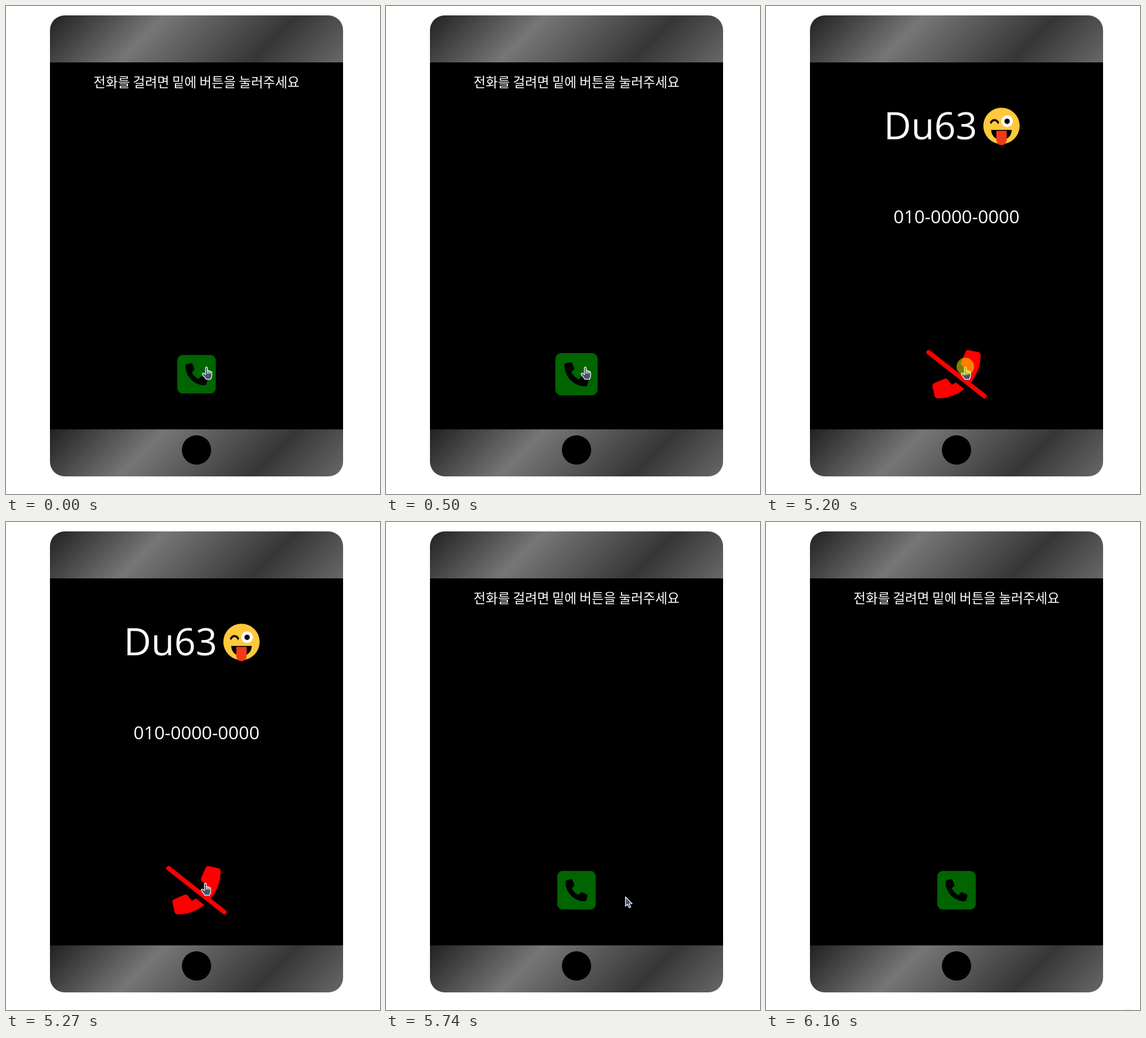
An HTML page with a canvas that plays this animation: 638 by 831 pixels, repeating every 6.23 s.

```html
<!DOCTYPE html>
<html lang="ko">
<head>
<meta charset="utf-8">
<title>Phone call</title>
<style>
  html, body { margin: 0; width: 100%; height: 100%; overflow: hidden; background: #fff; }
  canvas { display: block; }
</style>
</head>
<body>
<canvas id="stage" width="638" height="831"></canvas>
<script>
const ctx = document.getElementById('stage').getContext('2d');
const LOOP = 6230, STEP = 70;
const ANSWER = 2480, HANG_UP = 5410, LEAVE = 5670, LAST_CLICK = 6160;
const KOREAN = '"Noto Sans CJK KR", "Noto Sans CJK JP", "Noto Sans CJK", sans-serif';
const LATIN = '"Open Sans", "Noto Sans", sans-serif';

const callIcon = new Path2D('M64 32C28.7 32 0 60.7 0 96V416c0 35.3 28.7 64 64 64H384c35.3 0 64-28.7 64-64V96c0-35.3-28.7-64-64-64z');
const handset = new Path2D('M154.7 128.7c9.7-2.6 19.9 2.3 23.7 11.6l20 48c3.4 8.2 1 17.6-5.8 23.2L168 231.7c16.6 35.2 45.1 63.7 80.3 80.3l20.2-24.7c5.6-6.8 15-9.2 23.2-5.8l48 20c9.3 3.9 14.2 14 11.6 23.7l-12 44C336.9 378 329 384 320 384C196.3 384 96 283.7 96 160c0-9 6-16.9 14.7-19.3z');
const lowerPiece = new Path2D('M271 367.5L228 313.7c-8.7-10.8-23.7-14.5-36.5-9l-108.5 46.5c-14 6-21.5 21.2-18 35.8l23 100.8C91.3 502 103.8 512 118.5 512c107.4 0 206-37.5 284.2-99.7L314 342.8C300.6 352 286.6 360.3 271 367.5z');
const upperPiece = new Path2D('M471 344c65-79 105-179.5 105-289.5c0-14.7-10-27.2-24.3-30.5L451 .8c-14.7-3.4-29.7 4.2-35.8 18.1l-46.5 108.5c-5.4 12.8-1.8 27.7 9 36.5l53.8 44C419.2 232 404 256.2 386 277.4z');
const slash = new Path2D('M24 24L616 488');
const hand = new Path2D('M-1.6 1.5Q0-.6 1.6 1.5V6.6Q3 5.2 4.2 7.2Q5.8 6 6.8 8.2Q8.8 7.4 9.1 10V15Q9 18 6.8 21.2H-.6L-6.2 13.8Q-8 11-5.6 10.6Q-3.8 10.6-1.6 13Z');
const knuckles = new Path2D('M1.6 6V11M4.2 7V11M6.8 8V11');
const arrow = new Path2D('M.5 .5V16.4L4.2 13L6.7 18.8L9.4 17.6L7 12H12Z');

function disc(x, y, r, color) {
  ctx.fillStyle = color;
  ctx.beginPath();
  ctx.arc(x, y, r, 0, Math.PI * 2);
  ctx.fill();
}

function label(text, x, y, font, align) {
  ctx.font = font;
  ctx.textAlign = align;
  ctx.fillStyle = '#fff';
  ctx.fillText(text, x, y);
}

function metalBar(y, radii) {
  const cy = y + 40, metal = ctx.createLinearGradient(180, cy - 145, 470, cy + 145);
  metal.addColorStop(0, '#222020');
  metal.addColorStop(0.34, '#767676');
  metal.addColorStop(0.73, '#363636');
  metal.addColorStop(1, '#686868');
  ctx.fillStyle = metal;
  ctx.beginPath();
  ctx.roundRect(75, y, 500, 80, radii);
  ctx.fill();
}

// Icons share a 512 unit em and are centred on the button spot.
function icon(width, scale, paint) {
  const s = 75 / 512 * scale;
  ctx.save();
  ctx.translate(325, 627);
  ctx.scale(s, s);
  ctx.translate(-width / 2, -256);
  paint();
  ctx.restore();
}

function callButton(scale) {
  icon(448, scale, () => {
    ctx.fillStyle = '#006400';
    ctx.fill(callIcon);
    ctx.fillStyle = '#000';
    ctx.fill(handset);
  });
}

function hangUpButton() {
  icon(640, 1.1, () => {
    ctx.fillStyle = ctx.strokeStyle = '#f00';
    ctx.fill(lowerPiece);
    ctx.fill(upperPiece);
    ctx.lineWidth = 48;
    ctx.lineCap = 'round';
    ctx.stroke(slash);
  });
}

function emoji() {
  disc(401.7, 204.2, 31, '#ffc83d');
  ctx.strokeStyle = '#000';
  ctx.lineWidth = 3.4;
  ctx.lineCap = 'round';
  ctx.beginPath();
  ctx.arc(389.8, 200.5, 6.3, Math.PI * 1.1, Math.PI * 1.9);
  ctx.stroke();
  disc(411.3, 196.3, 10, '#fff');
  disc(411.3, 196.3, 4.6, '#000');
  ctx.beginPath();
  ctx.ellipse(401.7, 211, 17.5, 17.5, 0, 0, Math.PI);
  ctx.fill();
  ctx.fillStyle = '#f03a17';
  ctx.beginPath();
  ctx.roundRect(392.8, 212.5, 17.8, 24.5, [0, 0, 8.9, 8.9]);
  ctx.fill();
}

function cursor(x, y, shape, details) {
  ctx.save();
  ctx.translate(x, y);
  ctx.lineCap = ctx.lineJoin = 'round';
  ctx.fillStyle = '#46566f';
  ctx.strokeStyle = '#fff';
  ctx.lineWidth = 1.2;
  ctx.fill(shape);
  ctx.stroke(shape);
  if (details) ctx.stroke(details);
  ctx.restore();
}

// The pointer is sampled every 70 ms as it leaves the phone.
function leavingPointer(t) {
  const n = Math.floor((t - LEAVE) / STEP);
  if (n === 0) return [364, 620];
  const p = 1 - Math.pow(1 - Math.min((n - 1) / 6, 1), 1.4);
  return [408 + 209.5 * p, 638 + 206 * p];
}

function pointer(t) {
  if (t >= LEAVE) {
    const [x, y] = leavingPointer(t);
    cursor(x, y, arrow);
    if (t >= LAST_CLICK) click(x, y);
    return;
  }
  cursor(t < STEP ? 342 : 340, 614.5, hand, knuckles);
  if ([430, 5200].some(at => t >= at && t < at + STEP)) click(340, 614);
}

function click(x, y) {
  disc(x, y, 15, 'rgba(255, 255, 0, 0.5)');
}

function draw(t) {
  const calling = t >= ANSWER && t < HANG_UP;
  const blank = t >= HANG_UP && t < LEAVE;
  ctx.fillStyle = '#fff';
  ctx.fillRect(0, 0, 638, 831);
  metalBar(16, [25, 25, 0, 0]);
  metalBar(721, [0, 0, 25, 25]);
  ctx.fillStyle = '#000';
  ctx.fillRect(75, 96, 500, 625);
  if (!blank) disc(325, 756, 25, '#000');

  if (calling) {
    label('Du63', 201, 227, '64px ' + LATIN, 'left');
    emoji();
    label('010-0000-0000', 325, 370, '31px ' + LATIN, 'center');
    hangUpButton();
  } else {
    label('전화를 걸려면 밑에 버튼을 눌러주세요', 325, 138, '22.5px ' + KOREAN, 'center');
    const hover = t < ANSWER ? Math.min(Math.floor(t / STEP) / 2, 1) : 0;
    if (!blank) callButton(1 + 0.1 * hover);
  }
  pointer(t);
}

const start = performance.now();
function tick() {
  draw((performance.now() - start) % LOOP);
  requestAnimationFrame(tick);
}
tick();
</script>
</body>
</html>
```
